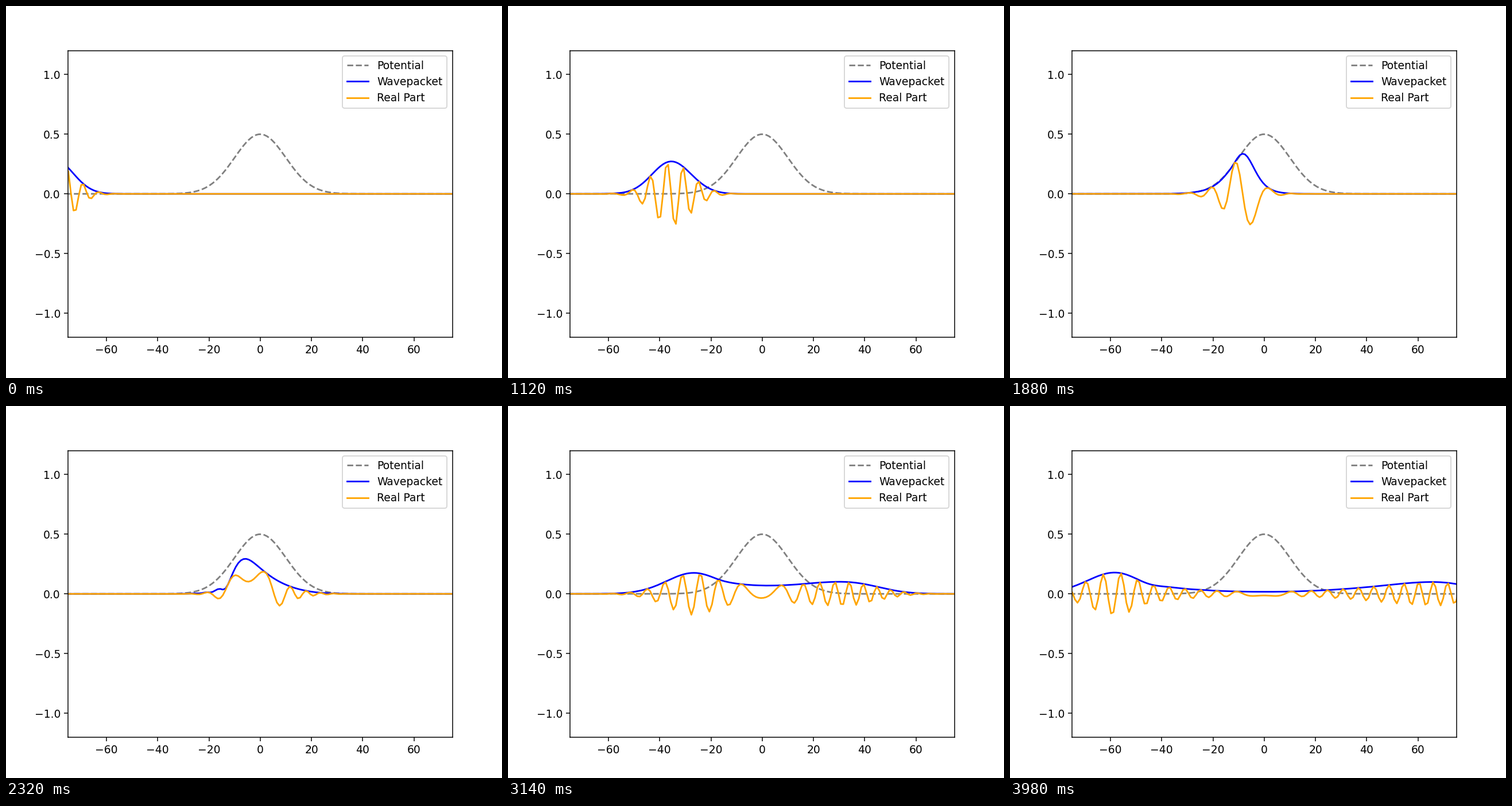
Write a matplotlib script that moves like this. It is 864 by 648 pixels and loops after 4 s.

```python
import numpy as np
import matplotlib.pyplot as plt
from matplotlib.animation import FuncAnimation

FRAMES, INTERVAL = 200, 20
N, HALF = 200, 100.0        # grid points, half width of the domain
X0, SIGMA, K0 = -80.0, 5.0, 1.0
DX, DT = 2 * HALF / N, 1.0

x = np.linspace(-HALF, HALF, N)
potential = 0.5 * np.exp(-x**2 / (2 * 10.0**2))


def gaussian_packet():
    norm = (2 * np.pi * SIGMA**2) ** -0.25
    return norm * np.exp(-(x - X0)**2 / (4 * SIGMA**2) + 1j * K0 * x)


def propagator():
    """Crank-Nicolson step of the Schroedinger equation (hbar = m = 1)."""
    hop = np.eye(N, k=1) + np.eye(N, k=-1)
    h = np.diag(1 / DX**2 + potential) - 0.5 / DX**2 * hop
    a = 0.5j * DT * h
    return np.linalg.solve(np.eye(N) + a, np.eye(N) - a)


step = propagator()
states = [gaussian_packet()]
for _ in range(FRAMES - 1):
    states.append(step @ states[-1])

fig, ax = plt.subplots(figsize=(6.4, 4.8), dpi=135)
ax.set_xlim(-75, 75)
ax.set_ylim(-1.2, 1.2)
ax.plot(x, potential, "--", color="gray", label="Potential")
envelope, = ax.plot(x, np.abs(states[0]), color="blue", label="Wavepacket")
real, = ax.plot(x, states[0].real, color="orange", label="Real Part")
ax.legend(loc="upper right")


def update(i):
    envelope.set_ydata(np.abs(states[i]))
    real.set_ydata(states[i].real)
    return envelope, real


anim = FuncAnimation(fig, update, frames=FRAMES, interval=INTERVAL,
                     repeat=True, repeat_delay=0)
plt.show()
```
